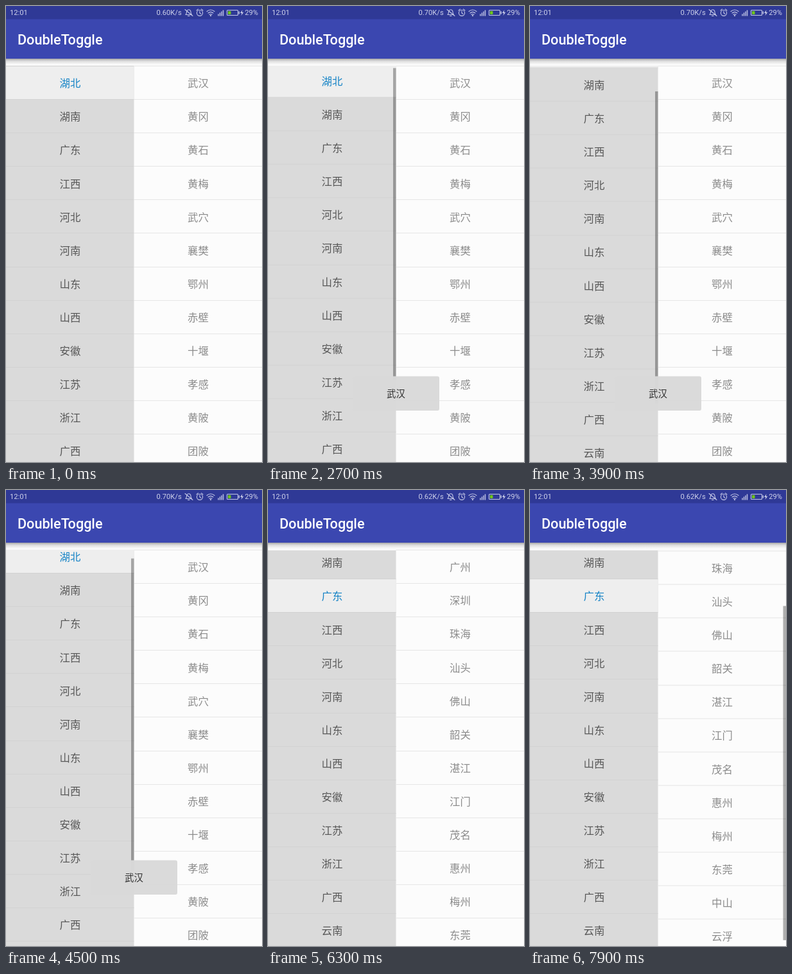
Write an HTML page that moves like this. It is 399 px wide and 710 px high and loops after 8000 ms.

```html
<!DOCTYPE html>
<html lang="zh-CN">
<head>
<meta charset="utf-8">
<title>DoubleToggle</title>
<style>
html, body { margin: 0; width: 100%; height: 100%; overflow: hidden; background: #fafafa; }
svg { display: block; width: 100%; height: 100%; }
.row { font: 16.4px "Noto Sans CJK SC", "Noto Sans CJK", sans-serif; text-anchor: middle; }
.left { fill: #575757; }
.right { fill: #8c8c8c; font-weight: 300; }
.on { fill: #1583c6; }
.status { font: 11.2px Roboto, sans-serif; fill: #cdd0ea; }
.title { font: 500 21.6px Roboto, sans-serif; fill: #fff; }
.icon { fill: none; stroke: #c3c7e6; stroke-width: 1.1; stroke-linecap: round; stroke-linejoin: round; }
</style>
</head>
<body>
<svg viewBox="0 0 399 710" preserveAspectRatio="none">
  <defs>
    <linearGradient id="shade" x1="0" y1="0" x2="0" y2="1">
      <stop offset="0" stop-opacity=".34"/>
      <stop offset=".4" stop-opacity=".12"/>
      <stop offset="1" stop-opacity="0"/>
    </linearGradient>
    <clipPath id="list"><rect y="93" width="399" height="617"/></clipPath>
  </defs>
  <rect width="399" height="710" fill="#fafafa"/>
  <g clip-path="url(#list)">
    <rect x="199" y="94" width="200" height="616" fill="#fcfcfc"/>
    <rect y="94" width="199.5" height="616" fill="#dadada"/>
    <g id="provinces"></g>
    <g id="hubei"></g>
    <g id="guangdong"></g>
    <rect id="leftBar" x="195" width="4.5" fill-opacity=".31"/>
    <rect id="rightBar" x="394.5" width="4.5" fill-opacity=".31"/>
  </g>
  <rect y="82" width="399" height="9" fill="url(#shade)"/>
  <rect y="20" width="399" height="62" fill="#3b47b0"/>
  <rect width="399" height="20.5" fill="#2f3996"/>
  <text class="title" x="18" y="60">DoubleToggle</text>

  <text class="status" x="6" y="14.3">12:01</text>
  <text class="status" id="speed" x="234.5" y="14.3"></text>
  <g class="icon">
    <path d="M280 13.5h9.5c-1.8-1.6-1.2-4-1.8-5.7-.9-2.8-5-2.8-5.8 0-.6 1.700 0 4.100-1.900 5.700M283.500 15.500h2.500M279 5.500l12 10"/>
    <circle cx="302" cy="10.800" r="4.600"/>
    <path d="M302 8v3l2 1.300M297 7l2.500-2.200M307 7l-2.500-2.200"/>
    <path d="M313 8.500q6-5 12 0M315 11q4-3.300 8 0M317 13.300q2-1.600 4 0"/>
    <circle cx="319" cy="15" r=".6"/>
    <path d="M331 13v2M333.500 11v4M336 9v6M338.500 7v8" stroke-width="1.400"/>
    <rect x="344.500" y="6.500" width="17" height="8" rx="1"/>
    <path d="M363.300 9v3" stroke-width="1.500"/>
  </g>
  <rect x="346" y="8" width="4.500" height="5" fill="#6fc41e"/>
  <path d="M368.500 6l-3.500 5h2.500l-1 4 3.800-5.200h-2.600z" fill="#cdd0ea"/>
  <text class="status" x="372.300" y="14.300">29%</text>

  <g id="toast">
    <rect x="132" y="576.500" width="135" height="53.500" rx="3" fill="#d9d9d9" fill-opacity=".97"/>
    <text class="row" x="199.500" y="609.300" style="font-size:14.400px" fill="#303030">武汉</text>
  </g>
</svg>
<script>
const $ = id => document.getElementById(id);
const TOP = 94, VIEW = 616, ROW = 52.09, LOOP = 8000, STEP = 200;
const SELECT_AT = 5900;

function add(parent, tag, attrs, text) {
  const el = document.createElementNS("http://www.w3.org/2000/svg", tag);
  for (const k in attrs) el.setAttribute(k, attrs[k]);
  if (text) el.textContent = text;
  parent.appendChild(el);
  return el;
}

function makeList(id, names, x, cls, line) {
  const g = $(id), rows = names.split(" ").map((name, i) => {
    const y = TOP + i * ROW;
    const back = add(g, "rect", { x, y: Math.round(y), width: 199.5, height: 52, fill: "#eee", visibility: "hidden" });
    add(g, "rect", { x, y: Math.round(y) - 1, width: 199.5, height: 1, fill: line });
    const label = add(g, "text", { class: "row " + cls, x: x + 100, y: y + 32.3 }, name);
    return { back, label };
  });
  return { g, rows, total: rows.length * ROW };
}

const provinces = makeList("provinces", "湖北 湖南 广东 江西 河北 河南 山东 山西 安徽 江苏 浙江 广西 云南 贵州 四川", 0, "left", "#d2d2d2");
const hubei = makeList("hubei", "武汉 黄冈 黄石 黄梅 武穴 襄樊 鄂州 赤壁 十堰 孝感 黄陂 团陂", 199.5, "right", "#e6e6e6");
const guangdong = makeList("guangdong", "广州 深圳 珠海 汕头 佛山 韶关 湛江 江门 茂名 惠州 梅州 东莞 中山 云浮", 199.5, "right", "#e6e6e6");

// Eased value through [time, value] keys.
function track(keys, t) {
  if (t <= keys[0][0]) return keys[0][1];
  for (let i = 1; i < keys.length; i++) {
    const [t0, a] = keys[i - 1], [t1, b] = keys[i];
    if (t < t1) return a + (b - a) * (1 - Math.cos(Math.PI * (t - t0) / (t1 - t0))) / 2;
  }
  return keys[keys.length - 1][1];
}

const leftScroll = [[2600, 0], [3300, 67], [3500, 67], [4500, 16], [5300, 59]];
const leftFade = [[5700, 1], [6100, 0]];
const toastFade = [[1700, 0], [2100, 1], [5300, 1], [5480, 0.47], [5520, 0.47], [5700, 0]];

function scrollTo(list, s) {
  list.g.setAttribute("transform", `translate(0 ${-s})`);
}

function setBar(bar, list, s, alpha) {
  const k = VIEW / list.total;
  bar.setAttribute("y", TOP + s * k);
  bar.setAttribute("height", VIEW * k);
  bar.setAttribute("opacity", alpha);
}

function draw(now) {
  // The screen refreshes five times a second.
  const t = Math.max(0, Math.floor((now % LOOP - 100) / STEP) * STEP + 100);
  const picked = t >= SELECT_AT;

  const s = track(leftScroll, t);
  scrollTo(provinces, s);
  setBar($("leftBar"), provinces, s, t > 2600 ? track(leftFade, t) : 0);
  provinces.rows.forEach(({ back, label }, i) => {
    const on = i === (picked ? 2 : 0);
    back.setAttribute("visibility", on ? "visible" : "hidden");
    label.setAttribute("class", on ? "row on" : "row left");
  });

  const u = Math.min(1, (t - 7100) / 800);
  const r = u < 0 ? 0 : 46 + 56.5 * (1 - (1 - u) ** 2);
  hubei.g.setAttribute("visibility", picked ? "hidden" : "inherit");
  guangdong.g.setAttribute("visibility", picked ? "inherit" : "hidden");
  for (const list of [hubei, guangdong])
    for (const row of list.rows) row.back.setAttribute("visibility", "hidden");
  scrollTo(guangdong, r);
  setBar($("rightBar"), guangdong, r, u < 0 ? 0 : 1);

  $("toast").setAttribute("opacity", track(toastFade, t));
  $("speed").textContent = (t < 500 ? "0.60" : t < 6300 ? "0.70" : "0.62") + "K/s";
}

let start;
function tick(now) {
  start ??= now;
  draw(now - start);
  requestAnimationFrame(tick);
}
draw(0);
requestAnimationFrame(tick);
</script>
</body>
</html>
```
